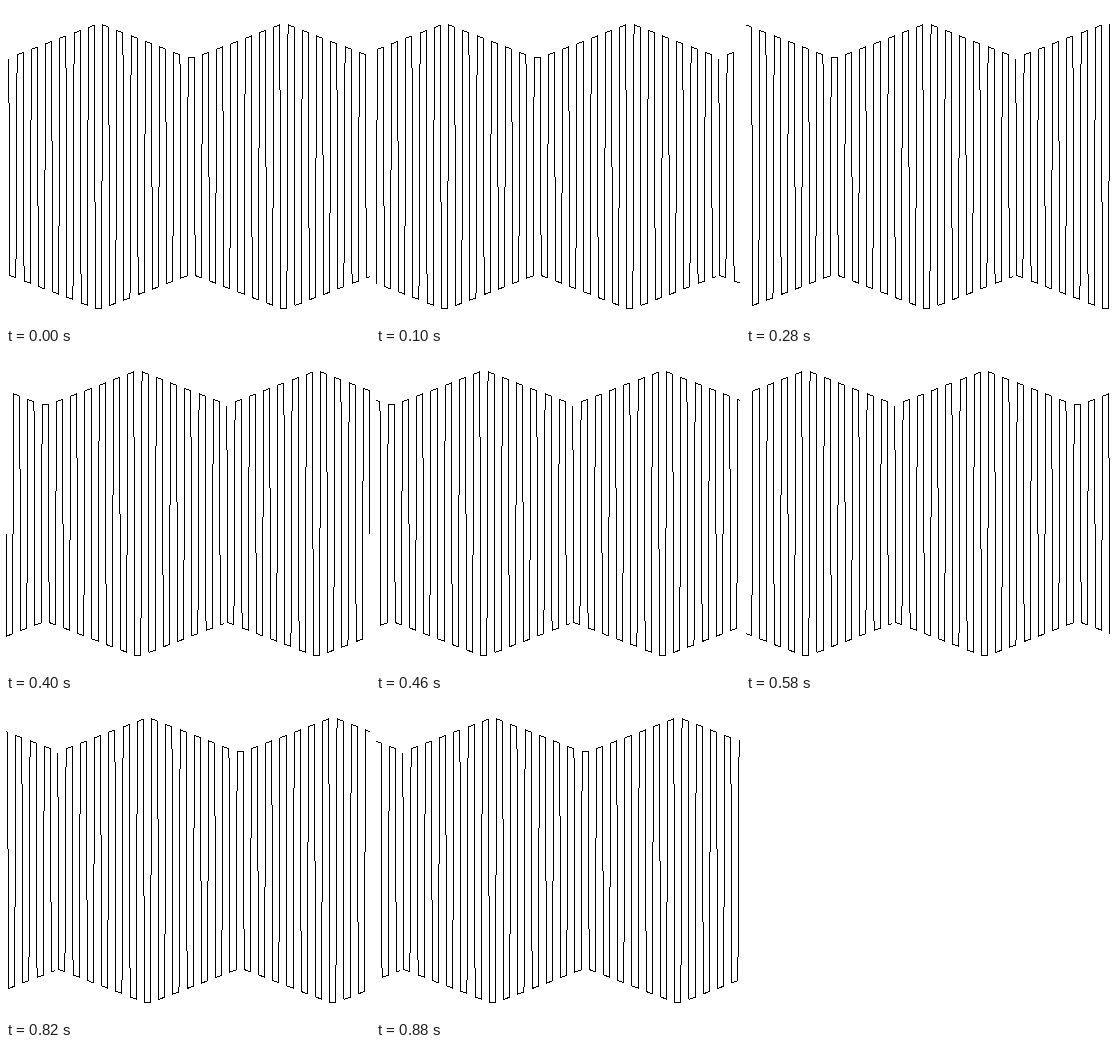
These frames come from a looping animation (364 by 319 pixels, 0.94 s). An HTML page with a canvas:

```html
<!DOCTYPE html>
<html lang="en">
<head>
<meta charset="utf-8">
<title>Scrolling pleats</title>
<style>
  html, body { margin: 0; width: 100%; height: 100%; overflow: hidden; background: #fff; }
  canvas { display: block; }
</style>
</head>
<body>
<canvas id="stage" width="364" height="319"></canvas>
<script>
const W = 364, H = 319;
const PITCH = 14.26, FOLDS = 26, PEAKS = [92.4, 277.5];
const STEPS = 15, FIRST_HOLD = 100, STEP_MS = 60;
const LOOP_MS = FIRST_HOLD + (STEPS - 1) * STEP_MS;

const ctx = document.getElementById('stage').getContext('2d');

// Height lost with distance from the nearest peak.
function drop(x) {
  const distance = Math.min(...PEAKS.map(p => Math.abs(x - p)));
  return 0.385 * Math.max(0, distance - 3);
}
const topPoint = x => [x, 18 + drop(x)];
const bottomPoint = x => [x, 302 - drop(x)];

function zigzag() {
  const points = [[2.3, 53]];
  for (let i = 0; i < FOLDS; i++) {
    const x = i * PITCH;
    points.push(bottomPoint(3.3 + x));
    if (i === FOLDS - 1) {
      points.push(bottomPoint(363));
    } else {
      points.push(bottomPoint(9.4 + x), topPoint(10.6 + x), topPoint(16.6 + x));
    }
  }
  return points;
}

// Crisp one-pixel line without antialiasing.
function pixelLine(c, [x0, y0], [x1, y1]) {
  const n = Math.ceil(Math.max(Math.abs(x1 - x0), Math.abs(y1 - y0)));
  for (let i = 0; i <= n; i++) {
    const t = i / n;
    c.fillRect(Math.round(x0 + (x1 - x0) * t), Math.round(y0 + (y1 - y0) * t), 1, 1);
  }
}

const strip = document.createElement('canvas');
strip.width = W;
strip.height = H;
const stripCtx = strip.getContext('2d');
zigzag().forEach((p, i, all) => { if (i) pixelLine(stripCtx, all[i - 1], p); });

function draw(now) {
  const t = now % LOOP_MS;
  const step = t < FIRST_HOLD ? 0 : 1 + Math.floor((t - FIRST_HOLD) / STEP_MS);
  const shift = Math.round(step * W / STEPS);
  ctx.fillStyle = '#fff';
  ctx.fillRect(0, 0, W, H);
  ctx.drawImage(strip, -shift, 0);
  ctx.drawImage(strip, W - shift, 0);
}

function tick() {
  draw(performance.now());
  requestAnimationFrame(tick);
}
tick();
</script>
</body>
</html>
```
